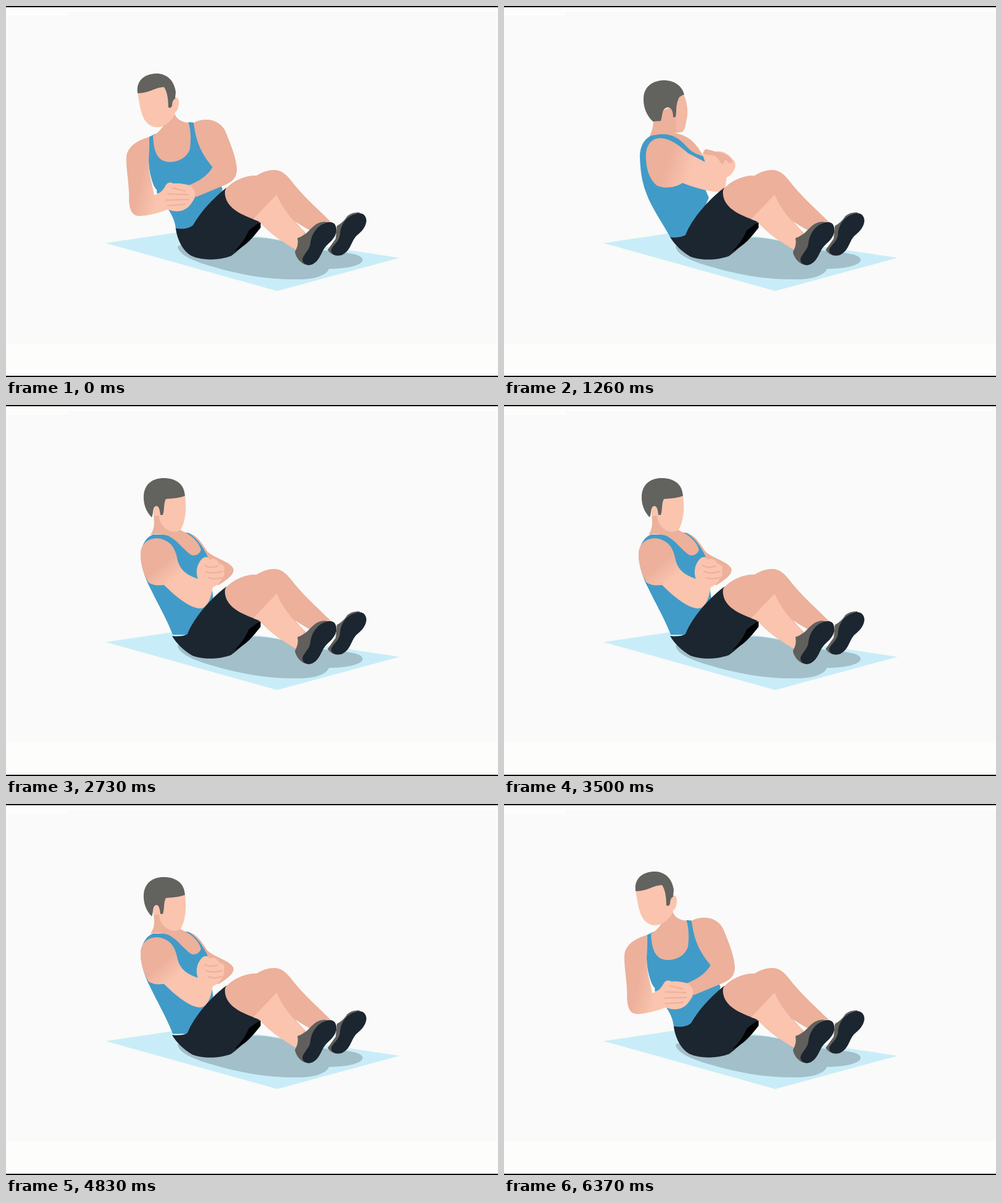
An HTML page that plays this animation: 800x604 px, repeating every 6.44 s.

```html
<!DOCTYPE html>
<html lang="en">
<head>
<meta charset="utf-8">
<title>Seated twist</title>
<style>
html, body { margin: 0; width: 100%; height: 100%; overflow: hidden; background: #f9faf9; }
svg { display: block; width: 100vw; height: 100vh; }
.skin { fill: #ecb09b; }
.light { fill: #fac4ae; }
.hair { fill: #62625f; }
.top { fill: #419bc8; }
.navy { fill: #1c2630; }
.shoe { fill: #605f5c; }
.crease { fill: none; stroke: #ecb09b; stroke-width: 2; stroke-linecap: round; }
</style>
</head>
<body>
<svg viewBox="0 0 800 604">
  <defs>
    <linearGradient id="armFront" gradientUnits="userSpaceOnUse" x1="212" y1="310" x2="246" y2="318">
      <stop offset="0" stop-color="#ecb09b"/><stop offset="1" stop-color="#fac4ae"/>
    </linearGradient>
    <linearGradient id="armMid" gradientUnits="userSpaceOnUse" x1="252" y1="260" x2="272" y2="284">
      <stop offset="0" stop-color="#ecb09b"/><stop offset="1" stop-color="#fac4ae"/>
    </linearGradient>
    <linearGradient id="armBack" gradientUnits="userSpaceOnUse" x1="264" y1="255" x2="304" y2="268">
      <stop offset="0" stop-color="#ecb09b"/><stop offset="1" stop-color="#fac4ae"/>
    </linearGradient>
  </defs>

  <rect width="800" height="604" fill="#f9faf9"/>
  <rect y="549" width="800" height="53" fill="#fdfefc"/>
  <path d="M0 2H800V9H100V16H0Z" fill="#fdfefc"/>
  <path d="M0 0H800V2H0ZM0 602H800V604H0Z"/>

  <path fill="#c9edf8" d="M162 386L324 362L640 410L441 464Z"/>
  <path fill="#a2bfca" d="M279 391C280 405 306 416 335 424C378 437 426 446 476 445C502 445 522 438 525 428C546 428 580 424 580 413C579 404 557 402 534 400C500 397 470 386 430 379C400 374 345 380 300 385Z"/>

  <g id="front">
    <path class="top" d="M233 213L241 209L298 189L306 190C308 216 318 241 336 262L352 298L330 370L276 363C275 350 270 341 265 333L246 305C237 288 232 268 232 250Z"/>
    <path class="skin" d="M273 172C276 184 285 189 297 190C301 205 301 219 299 233C294 247 281 254 265 254C248 253 240 240 239 211C247 207 252 201 257 193Z"/>
    <path class="light" d="M214 141C217 158 219 179 229 190C237 198 248 200 258 194C267 189 275 179 275 173C281 170 283 154 279 150Q276 148 273 150L262 130L235 132Z"/>
    <path class="hair" d="M214 142C211 121 226 110 245 110C263 110 274 123 276 140L275 151Q270 153 270 163L267 166L264 165C264 152 262 139 257 132C249 132 243 135 235 138Q224 142 214 142Z"/>
    <path class="skin" d="M305 190C325 180 350 185 358 207C366 227 373 244 375 261C377 276 371 285 357 291L309 311L296 292C311 287 328 277 336 262C318 241 309 222 305 190Z"/>
    <path fill="url(#armFront)" d="M233 213C213 219 199 228 196 244C194 260 201 291 200 316C201 331 204 342 218 342C234 341 249 336 264 331L256 302L241 308C238 290 232 276 232 250Z"/>
    <path d="M239 291L246 301L241 305Z" fill="#f9faf9"/>
    <path class="light" d="M247 305C255 302 257 296 261 290C265 286 269 287 272 289C282 288 293 290 300 293C307 298 310 307 306 314C300 324 294 333 281 334C272 335 264 332 258 329Z"/>
    <path class="crease" d="M270 296L291 301M263 306L296 307M260 316L297 315M263 325L291 323"/>
  </g>

  <g id="mid">
    <path class="skin" d="M293 207C312 211 319 227 328 239C340 250 365 255 370 267C371 277 359 284 346 293L325 292L296 225Z"/>
    <path class="top" d="M219 246C219 231 227 215 239 211L259 211L288 207L298 209C313 219 322 234 328 247L337 315L305 374L271 374C263 352 244 318 234 297C225 280 220 261 219 246Z"/>
    <path class="skin" d="M240 178L241 191Q241 203 235 211Q252 209 264 213C279 220 291 239 303 245Q314 245 317 236C315 224 300 211 290 207L283 203L270 180Z"/>
    <path class="light" d="M256 150L291 147C294 168 292 190 284 203Q278 208 269 206C257 203 249 191 249 180L240 181Q238 168 245 164Z"/>
    <path class="hair" d="M237 183C226 172 223 158 224 146C226 128 239 119 256 119C277 119 290 129 291 148Q281 152 260 153C256 160 258 170 255 179L251 179C250 169 248 163 243 165C238 168 240 176 237 183Z"/>
    <path fill="url(#armMid)" d="M219 240C221 224 232 217 247 217C264 219 274 229 278 248C281 267 293 277 312 283C308 272 310 260 318 251C325 245 330 248 331 252C339 248 345 253 346 258C355 260 357 265 354 271C357 277 352 280 351 282C350 289 342 294 336 297C334 310 330 328 318 331C302 333 278 314 257 293C247 294 238 294 231 288C223 274 218 256 219 240Z"/>
    <path class="crease" d="M323 261Q331 267 344 262M325 271Q336 276 351 271M329 281Q337 285 350 281"/>
  </g>

  <g id="back">
    <path class="skin" d="M243 184Q243 201 236 213L279 215L301 238L326 249Q317 229 304 218Q292 209 275 206L270 178Z"/>
    <path class="top" d="M221 249C220 226 231 211 246 210C272 205 285 215 300 232Q310 242 326 245L327 254L310 258L333 312L306 377L270 376C259 355 239 328 230 301C223 281 222 265 221 249Z"/>
    <path class="skin" d="M256 176Q260 166 270 166L282 150L292 143C297 156 301 171 296 189Q294 204 289 205L276 207Q264 203 256 188Z"/>
    <path class="light" d="M283 151L292 144C297 156 300 171 296 188Q294 203 289 204L281 204L278 181Z" opacity=".5"/>
    <path class="hair" d="M242 188C230 177 226 161 227 149C228 131 242 121 260 121C278 121 290 131 293 144Q284 147 283 153C279 162 281 172 279 181L275 181C275 171 272 165 266 165C256 167 258 179 255 187Z"/>
    <path fill="url(#armBack)" d="M231 251C229 229 238 215 255 215C275 217 286 229 300 240L327 254L323 242Q324 235 328 233L344 237C356 234 367 243 371 249Q377 253 376 262C373 272 367 277 362 279L360 292L357 303C336 303 313 297 290 288C279 296 260 298 248 292C237 282 232 268 231 251Z"/>
    <path class="skin" d="M324 241Q325 234 329 233L343 237Q359 238 369 248L372 255L366 256L360 250L355 258L348 249L343 244Z"/>
  </g>

  <path id="shorts" class="navy"/>
  <path fill="#020305" d="M414 351L414 361C403 375 390 392 371 399Q386 386 395 365Z"/>

  <path class="skin" d="M398 283C412 271 426 266 438 267C450 268 457 276 465 286C486 313 511 334 532 355L508 372Q490 364 472 352L415 310Z"/>
  <path d="M473 355Q485 367 496 372L481 378Z" fill="#f9faf9"/>
  <path class="skin" d="M357 298C367 286 386 277 402 276C422 276 434 288 442 306C451 329 465 347 487 369L474 398C453 387 431 372 412 351C390 342 368 335 359 317C356 310 355 303 357 298Z"/>
  <path class="light" d="M402 347Q421 327 440 307C449 329 465 348 485 368L474 398C453 387 431 371 412 351Z"/>

  <g id="shoe">
    <path class="shoe" d="M474 378C489 373 493 364 501 358Q510 350 522 352L526 360L488 421C479 419 471 409 470 400C474 393 476 386 474 378Z"/>
    <path class="navy" d="M518 354C528 350 536 352 537 363C538 374 530 382 522 389C512 398 512 413 499 420C489 425 479 418 483 409C487 401 494 396 495 386C496 373 505 358 518 354Z"/>
  </g>
  <path class="shoe" d="M538 358Q549 352 555 342Q563 335 575 336L560 370L536 406Q527 404 523 397L536 379Z"/>
  <path class="navy" d="M567 339C578 334 586 340 586 350C585 361 577 368 570 374C561 383 561 398 547 405C537 409 527 404 529 396C532 389 541 384 543 373C543 359 551 344 567 339Z"/>
  <use href="#shoe"/>
</svg>
<script>
const LOOP = 6440, STEP = 70;
const HOLD = 525, LEAD = 245;
const ORDER = ['front', 'mid', 'back', 'mid'];
const HIP = 'C365 378 382 399 363 407C343 415 318 413 303 407';
const SHORTS = {
  front: 'M276 362Q294 365 304 357C317 334 337 313 358 296L412 351Q400 382 366 407C345 415 318 414 302 407C287 399 278 379 276 362Z',
  side: 'M270 376Q286 378 295 373C306 345 335 313 358 296L412 351Q400 382 366 407C345 415 318 414 303 408C289 400 277 388 270 376Z'
};
const poses = ['front', 'mid', 'back'].map(id => document.getElementById(id));
const shorts = document.getElementById('shorts');

function poseAt(ms) {
  const t = Math.floor((ms % LOOP) / STEP) * STEP;
  return ORDER[Math.floor((t - LEAD) / HOLD + 1) % ORDER.length];
}

function draw(ms) {
  const pose = poseAt(ms);
  for (const g of poses) g.style.display = g.id === pose ? '' : 'none';
  shorts.setAttribute('d', pose === 'front' ? SHORTS.front : SHORTS.side);
}

let start;
function tick(now) {
  start ??= now;
  draw(now - start);
  requestAnimationFrame(tick);
}
draw(0);
requestAnimationFrame(tick);
</script>
</body>
</html>
```
